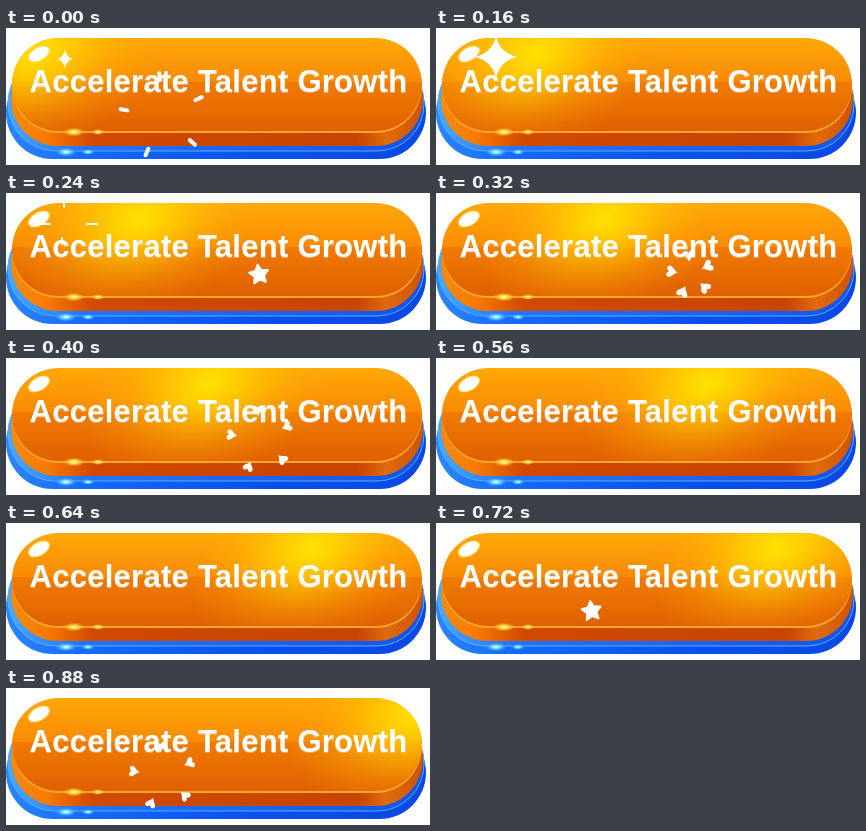
Animation, 424 px wide and 137 px high, one loop 0.96 s. Source, as an HTML page:

```html
<!DOCTYPE html>
<html lang="en">
<head>
<meta charset="utf-8">
<title>Accelerate Talent Growth</title>
<style>
html, body { margin: 0; width: 100%; height: 100%; overflow: hidden; background: #fff; }
svg { display: block; width: 424px; height: 137px; }
text {
  font: bold 31px "Liberation Sans", Arial, sans-serif;
  letter-spacing: .27px;
  fill: #fff;
  filter: drop-shadow(.5px 1px .6px #f0c8a890);
}
.glow { animation: sweep .96s steps(12) infinite; }
/* Visible for one 80 ms step, number --k of 12 */
.at {
  visibility: hidden;
  animation: blink .96s step-end infinite;
  animation-delay: calc((var(--k) - 12) * 80ms);
}
@keyframes sweep { from { transform: translateX(30px); } to { transform: translateX(444px); } }
@keyframes blink { 0% { visibility: visible; } 8.33%, 100% { visibility: hidden; } }
</style>
</head>
<body>
<svg viewBox="0 0 424 137">
  <defs>
    <linearGradient id="face" x2="0" y2="1">
      <stop offset="0" stop-color="#ffa908"/>
      <stop offset=".47" stop-color="#f98a04"/>
      <stop offset=".47" stop-color="#f07b02"/>
      <stop offset="1" stop-color="#e06002"/>
    </linearGradient>
    <linearGradient id="side">
      <stop offset="0" stop-color="#f08a10"/>
      <stop offset=".08" stop-color="#fb7c02"/>
      <stop offset=".2" stop-color="#d04a02"/>
      <stop offset=".84" stop-color="#c84402"/>
      <stop offset=".91" stop-color="#e06a0c"/>
      <stop offset="1" stop-color="#cf5406"/>
    </linearGradient>
    <linearGradient id="base">
      <stop offset="0" stop-color="#2a86ff"/>
      <stop offset=".2" stop-color="#1468fa"/>
      <stop offset=".6" stop-color="#0a50ee"/>
      <stop offset="1" stop-color="#0a48e4"/>
    </linearGradient>
    <linearGradient id="band">
      <stop offset="0" stop-color="#48a8ff"/>
      <stop offset=".18" stop-color="#2474f6"/>
      <stop offset="1" stop-color="#1454e8"/>
    </linearGradient>
    <radialGradient id="sun">
      <stop offset="0" stop-color="#ffe600" stop-opacity=".95"/>
      <stop offset=".3" stop-color="#ffd400" stop-opacity=".7"/>
      <stop offset=".65" stop-color="#ffba00" stop-opacity=".28"/>
      <stop offset="1" stop-color="#ffa000" stop-opacity="0"/>
    </radialGradient>
    <radialGradient id="gold">
      <stop offset="0" stop-color="#fffbd0"/>
      <stop offset=".35" stop-color="#ffe04a"/>
      <stop offset="1" stop-color="#ffb020" stop-opacity="0"/>
    </radialGradient>
    <radialGradient id="ice">
      <stop offset="0" stop-color="#f4ffff"/>
      <stop offset=".35" stop-color="#7fdcff"/>
      <stop offset="1" stop-color="#2aa0ff" stop-opacity="0"/>
    </radialGradient>
    <clipPath id="pill"><rect x="6" y="10" width="410" height="93" rx="46.5"/></clipPath>
    <path id="spark" d="M0-21Q4-4 21 0Q4 4 0 21Q-4 4-21 0Q-4-4 0-21Z" fill="#fff"/>
    <path id="heart" d="M0 4.8C-2-.2-5.6-.4-5.2-3.4C-4.8-6.2-1-6 0-3.2C1-6 4.8-6.2 5.2-3.4C5.6-.4 2-.2 0 4.8Z" fill="#fff"/>
    <rect id="dash" x="-2" y="-5.5" width="4" height="11" rx="2" fill="#fff"/>
  </defs>

  <rect x="0" y="38" width="420" height="93" rx="46.5" fill="url(#base)"/>
  <rect x="2" y="28" width="416" height="95" rx="47" fill="url(#band)" stroke="#4fb0ff"/>
  <rect x="5" y="24" width="412" height="94" rx="47" fill="url(#side)"/>
  <rect x="6" y="12" width="410" height="93" rx="46.5" fill="#ffa52c"/>
  <g clip-path="url(#pill)">
    <rect x="6" y="10" width="410" height="93" fill="url(#face)"/>
    <g class="glow">
      <ellipse cy="0" rx="125" ry="100" transform="translate(0 26) skewX(-18)" fill="url(#sun)"/>
    </g>
  </g>

  <ellipse cx="33" cy="26" rx="11.5" ry="6.5" transform="rotate(-30 33 26)" fill="#fff" stroke="#ffd65a"/>
  <g id="lights">
    <ellipse cx="68" cy="104" rx="11" ry="4.5" fill="url(#gold)"/>
    <ellipse cx="92" cy="104" rx="7" ry="3" fill="url(#gold)"/>
    <ellipse cx="60" cy="124" rx="11" ry="4.5" fill="url(#ice)"/>
    <ellipse cx="82" cy="124" rx="7" ry="3" fill="url(#ice)"/>
  </g>

  <text x="23.5" y="64">Accelerate Talent Growth</text>

  <use class="at" style="--k:0" href="#spark" transform="translate(59 31) scale(.36 .44)"/>
  <use class="at" style="--k:1" href="#spark" transform="translate(59.5 30) scale(.7)"/>
  <use class="at" style="--k:2" href="#spark" transform="translate(60 29)"/>
  <path class="at" style="--k:3" d="M58 9v5M81 31h10M56 45v6M36 31h8" stroke="#fff" stroke-width="2" stroke-linecap="round"/>

  <g id="bursts"></g>
</svg>
<script>
const angles = [-95, -26, 42, 114, 189];

const ring = (shape, radius, scale = 1) => angles.map(a =>
  `<use href="#${shape}" transform="rotate(${a + 90}) translate(0 ${-radius}) scale(${scale})"/>`).join('');

const starPath = () => {
  const points = Array.from({ length: 10 }, (_, i) => {
    const r = i % 2 ? 5 : 10, a = (i * 36 - 98) * Math.PI / 180;
    return `${(r * Math.cos(a) - 1.5).toFixed(2)},${(r * Math.sin(a)).toFixed(2)}`;
  });
  return `<polygon points="${points.join(' ')}" fill="#fff" stroke="#fff" stroke-width="2" stroke-linejoin="round"/>`;
};

// A star bursts into hearts, which fly out and end as dashes
const burst = (x, y, start) => {
  const stages = [starPath(), ring('heart', 18, 1.1), ring('heart', 28.5), ring('dash', 39.5)];
  return `<g transform="translate(${x} ${y})">` + stages.map((s, i) =>
    `<g class="at" style="--k:${(start + i) % 12}">${s}</g>`).join('') + '</g>';
};

document.getElementById('bursts').innerHTML = burst(254.5, 81.5, 3) + burst(157, 88, 9);
</script>
</body>
</html>
```
